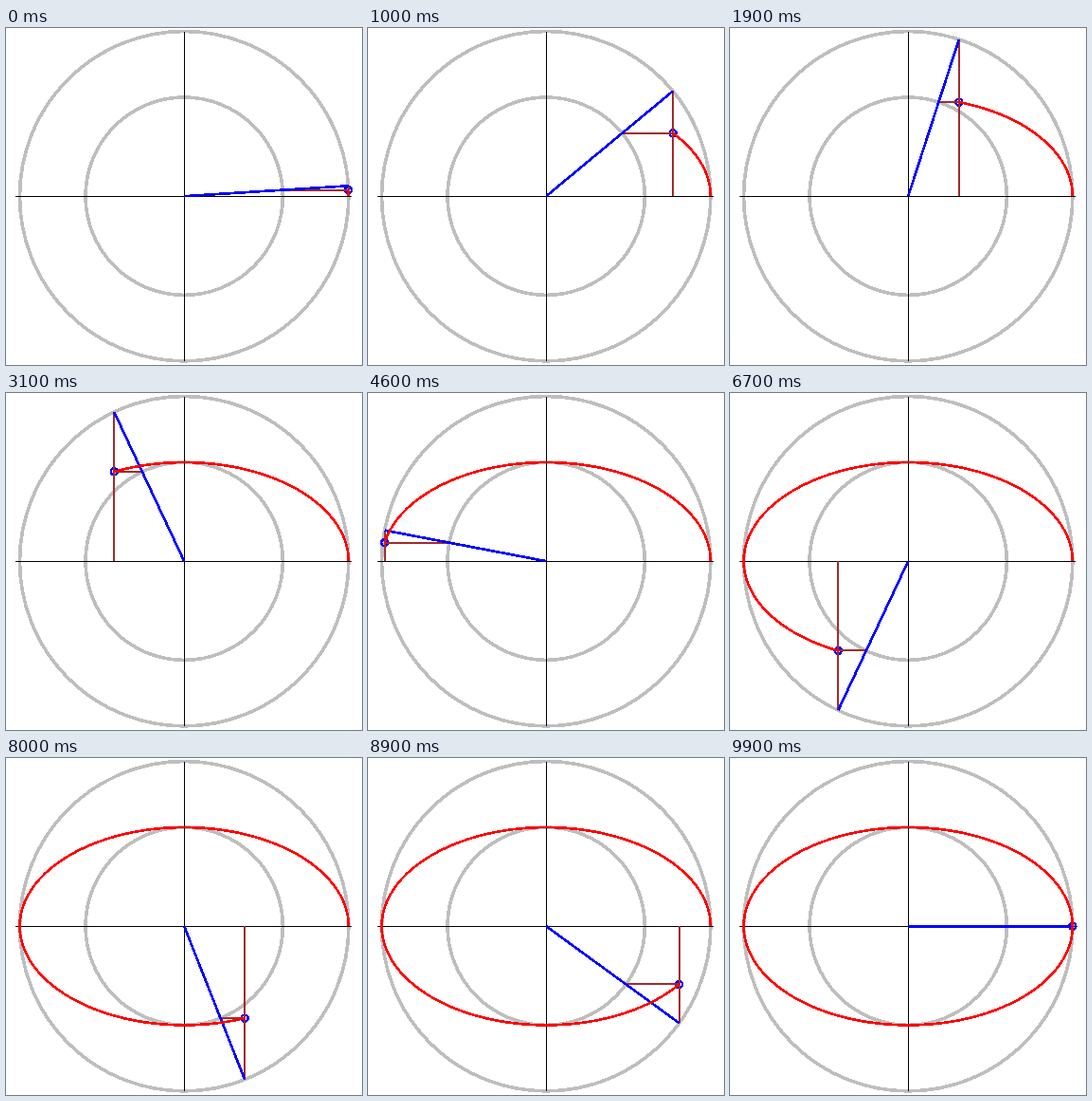
Animation, 376 px wide and 355 px high, one loop 10 s. Source, as an HTML page:

```html
<!DOCTYPE html>
<html lang="en">
<head>
<meta charset="utf-8">
<title>Ellipse from two circles</title>
<style>
  html, body { margin: 0; width: 100%; height: 100%; overflow: hidden; background: #fff; }
  svg { display: block; width: 376px; height: 355px; shape-rendering: crispEdges; }
  svg * { fill: none; stroke-linejoin: round; }
  .ring { stroke: #bebebe; stroke-width: 3.6; }
  .axis { stroke: #000; stroke-width: 1; }
  .guide { stroke: #a52a2a; stroke-width: 2; }
  .arm { stroke: #00f; stroke-width: 2.7; }
  .dot { stroke: #00f; stroke-width: 2.5; }
  .trace { stroke: #f00; stroke-width: 2.7; }
</style>
</head>
<body>
<svg viewBox="0 0 376 355">
  <circle class="ring" cx="188.2" cy="177.2" r="173.7"/>
  <circle class="ring" cx="188.2" cy="177.2" r="104.2"/>
  <path class="axis" d="M10 177.5H365M188.5 4V351"/>
  <circle class="dot" id="dot" r="3.5"/>
  <path class="guide" id="guide"/>
  <path class="arm" id="arm"/>
  <path class="trace" id="trace"/>
</svg>
<script>
  const CX = 188.2, CY = 177.2, OUTER = 173.7, INNER = 104.2;
  const STEPS = 100, STEP_MS = 100;
  const $ = id => document.getElementById(id);
  const guide = $('guide'), arm = $('arm'), dot = $('dot'), trace = $('trace');

  const at = (step, rx, ry) => {
    const a = step / STEPS * 2 * Math.PI;
    return [CX + rx * Math.cos(a), CY - ry * Math.sin(a)];
  };

  // The tracing point takes x from the outer circle and y from the inner one.
  function draw(step) {
    const [ox, oy] = at(step, OUTER, OUTER);
    const [ix, iy] = at(step, INNER, INNER);
    guide.setAttribute('d', `M${ox} ${CY}V${oy}M${ix} ${iy}H${ox}`);
    arm.setAttribute('d', `M${CX} ${CY}L${ox} ${oy}`);
    dot.setAttribute('cx', ox);
    dot.setAttribute('cy', iy);
    const points = Array.from({ length: step + 1 }, (_, i) => at(i, OUTER, INNER));
    trace.setAttribute('d', 'M' + points.join('L'));
  }

  const start = performance.now();
  let shown = 0;
  function tick() {
    const elapsed = Math.max(0, performance.now() - start);
    const step = Math.floor(elapsed / STEP_MS) % STEPS + 1;
    if (step !== shown) draw(shown = step);
    requestAnimationFrame(tick);
  }
  tick();
</script>
</body>
</html>
```
